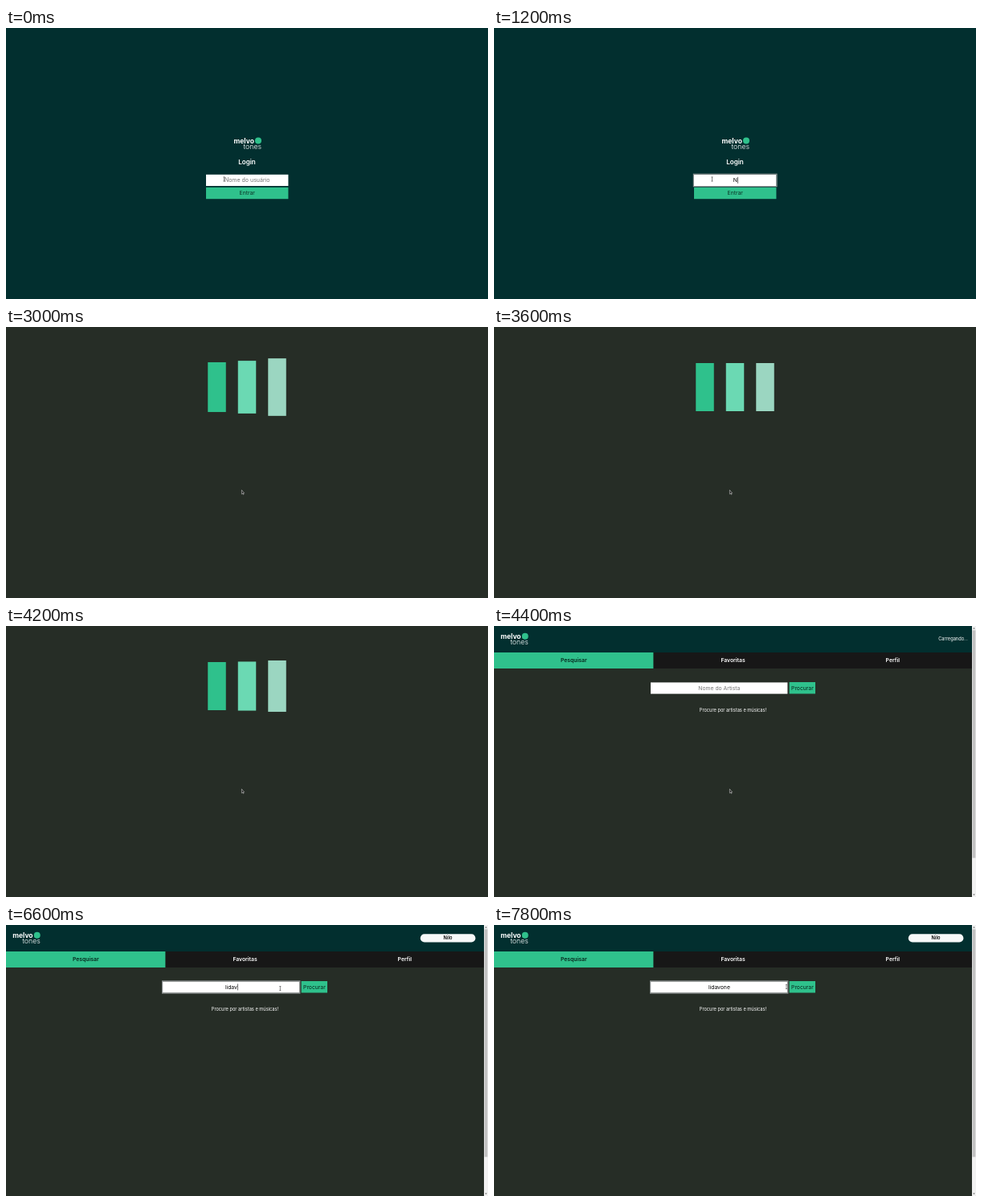
Animation, 600 px wide and 338 px high, one loop 8000 ms. Source, as an HTML page:

```html
<!DOCTYPE html>
<html lang="pt-BR">
<head>
<meta charset="utf-8">
<title>Login e pesquisa</title>
<style>
  html, body { margin: 0; width: 100%; height: 100%; overflow: hidden; background: #022f2f; }
  svg { display: block; width: 100vw; height: 100vh; }
  text { font-family: Inter, "Open Sans", sans-serif; font-size: 6.8px; }
  .mid { text-anchor: middle; }
  .semi { font-weight: 600; }
  .small { font-size: 5.7px; }
  .white { fill: #fff; }
  .hint { fill: #757575; }
  .ring { fill: none; stroke: #8d9292; stroke-width: 1.2; }
  .caret { fill: #111; }
</style>
</head>
<body>
<svg viewBox="0 0 600 338" preserveAspectRatio="none">
  <defs>
    <g id="logo">
      <text class="white" y="8" style="font-size:8.5px;font-weight:700">melvo</text>
      <text class="white" x="12" y="15" style="font-size:8.8px;font-weight:300">tones</text>
      <circle cx="30.5" cy="4.5" r="4" fill="#2fc18c"/>
    </g>
  </defs>

  <g id="login">
    <rect width="600" height="338" fill="#022f2f"/>
    <use href="#logo" x="283.5" y="136"/>
    <text class="mid semi white" x="300" y="170.4" style="font-size:8.1px">Login</text>
    <rect x="249" y="182.8" width="102.4" height="14.2" fill="#fff"/>
    <rect class="ring" id="userRing" x="248.4" y="182.2" width="103.6" height="15.4"/>
    <text class="mid hint" id="userHint" x="300.2" y="192" style="font-size:7px">Nome do usuário</text>
    <text class="mid" id="user" x="300.2" y="192"></text>
    <rect class="caret" id="userCaret" y="185.8" width=".6" height="8"/>
    <rect id="enter" x="249" y="198.8" width="102.4" height="14.4"/>
    <text class="mid" id="enterText" x="300.2" y="208.2">Entrar</text>
  </g>

  <g id="loader">
    <rect width="600" height="338" fill="#262d26"/>
    <rect class="bar" x="251.25" width="22.5" fill="#2fc18c"/>
    <rect class="bar" x="288.75" width="22.5" fill="#6bd9b3"/>
    <rect class="bar" x="326.25" width="22.5" fill="#9bd6c1"/>
  </g>

  <g id="search">
    <rect width="600" height="338" fill="#262d26"/>
    <rect width="595" height="33" fill="#022f2f"/>
    <use href="#logo" x="8.2" y="8.2"/>
    <text class="small white" id="wait" x="590" y="18.2" text-anchor="end">Carregando...</text>
    <g id="pill">
      <rect x="515.8" y="11.3" width="68.6" height="10.2" rx="5.1" fill="#f7f9f9"/>
      <text class="mid semi small" x="550" y="18.4">Nilo</text>
    </g>
    <rect y="33" width="595" height="20" fill="#171717"/>
    <rect y="33" width="198.4" height="20" fill="#2fc18c"/>
    <text class="mid semi" x="99.3" y="45.3" fill="#06251c">Pesquisar</text>
    <text class="mid semi white" x="297.5" y="45.3">Favoritas</text>
    <text class="mid semi white" x="496.3" y="45.3">Perfil</text>
    <rect x="195" y="70.4" width="170.4" height="14.2" fill="#fff"/>
    <rect class="ring" id="artistRing" x="194.6" y="69.9" width="171.2" height="15.2"/>
    <text class="mid hint" id="artistHint" x="280.4" y="79.7">Nome do Artista</text>
    <text class="mid" id="artist" x="280.4" y="79.7"></text>
    <rect class="caret" id="artistCaret" y="73.4" width=".6" height="8"/>
    <rect x="367.6" y="70" width="32.4" height="14.5" fill="#2fc18c"/>
    <text class="mid" x="383.9" y="79.7" fill="#06251c">Procurar</text>
    <text class="mid small white" x="297.5" y="107.4">Procure por artistas e músicas!</text>
    <rect x="595" width="5" height="338" fill="#f1f1f1"/>
    <rect x="595.6" y="5.3" width="3.8" height="284" fill="#c1c1c1"/>
    <path d="M596.3 3.4h2.4l-1.2-1.5zM596.3 334.6h2.4l-1.2 1.5z" fill="#505050"/>
  </g>

  <g id="cursor">
    <path id="arrow" d="M-.6-2.6V2.3L.5 1.4l.8 1.6.7-.4-.7-1.5H2.6z" fill="#111" stroke="#eee" stroke-width=".5"/>
    <path id="beam" d="M-1-2.6H1M0-2.6V2.6M-1 2.6H1" fill="none" stroke="#333" stroke-width=".6"/>
    <path id="hand" d="M-.8-2.4h.9v2l1.9.5v1.5L1.4 2.8H-1L-2 .9l.5-.6.7.5z" fill="#fff" stroke="#111" stroke-width=".6"/>
  </g>
</svg>
<script>
const LOOP = 8000, TICK = 200;
const LOADING = 3000, SEARCH = 4400;
const $ = id => document.getElementById(id);
const bars = document.querySelectorAll('.bar');

const show = (id, on) => { $(id).style.display = on ? '' : 'none'; };

// time, x, y
const path = [
  [0, 271.5, 188.5], [2100, 271.5, 188.5], [2500, 294, 206], [4700, 294, 206],
  [5300, 285.8, 82], [6200, 285.8, 82], [6900, 383, 77], [7100, 383, 77],
  [7200, 371, 77], [7500, 371, 77], [7700, 364, 77], [LOOP, 364, 77]
];

const fields = [
  { id: 'user', word: 'Nilo', focus: 300, blur: 2700, keys: [1150, 1350, 1450, 1600] },
  { id: 'artist', word: 'lidavone', focus: 5300, blur: LOOP,
    keys: [6000, 6140, 6280, 6420, 6560, 6700, 6840, 7000] }
];

function cursorAt(t) {
  const i = path.findIndex((p, n) => n && t <= p[0]);
  const [a, b] = [path[i - 1], path[i]];
  const k = (t - a[0]) / (b[0] - a[0]);
  return [a[1] + (b[1] - a[1]) * k, a[2] + (b[2] - a[2]) * k];
}

// cubic-bezier(0, .5, .5, 1), solved by bisection
function easeOut(x) {
  let lo = 0, hi = 1;
  for (let i = 0; i < 24; i++) {
    const s = (lo + hi) / 2;
    if (1.5 * s * s - 0.5 * s ** 3 < x) lo = s; else hi = s;
  }
  return 1.5 * lo - 0.5 * lo ** 3;
}

function drawField(f, t) {
  const typed = f.keys.filter(k => k <= t);
  const focused = t >= f.focus && t < f.blur;
  const last = typed.length ? typed[typed.length - 1] : f.focus;
  const text = $(f.id);
  text.textContent = f.word.slice(0, typed.length);
  show(f.id + 'Hint', !typed.length);
  show(f.id + 'Ring', focused);
  show(f.id + 'Caret', focused && (t - last) % 1000 < 500);
  const half = typed.length ? text.getComputedTextLength() / 2 : 0;
  $(f.id + 'Caret').setAttribute('x', +text.getAttribute('x') + half + 0.3);
}

function drawBars(t) {
  const phase = 0.15 + (t - LOADING) * 0.00095;
  bars.forEach((bar, i) => {
    const p = (phase + 0.2 - i * 0.1) % 1;
    const h = 96 - 36 * easeOut(Math.min(1, p * 2));
    bar.setAttribute('y', 75 - h / 2);
    bar.setAttribute('height', h);
  });
}

function drawCursor(t) {
  const [x, y] = cursorAt(t);
  const login = t < LOADING, search = t >= SEARCH;
  const inRow = search && y > 70 && y < 85;
  const hover = login && y > 198.7;
  const beam = login && y < 197 || inRow && x < 366;
  const hand = hover || inRow && x > 367;
  show('beam', beam);
  show('hand', hand);
  show('arrow', !beam && !hand);
  $('cursor').setAttribute('transform', `translate(${x} ${y})`);
  $('enter').setAttribute('fill', hover ? '#d0d1d4' : '#2fc18c');
}

function render(t) {
  show('login', t < LOADING);
  show('loader', t >= LOADING && t < SEARCH);
  show('search', t >= SEARCH);
  if (t < LOADING) drawField(fields[0], t);
  else if (t < SEARCH) drawBars(t);
  else drawField(fields[1], t);
  $('enterText').setAttribute('fill', t < 1600 ? '#0b3427' : '#000');
  show('wait', t < 6200);
  show('pill', t >= 6200);
  drawCursor(t);
}

const start = performance.now();
function frame() {
  const t = (performance.now() - start) % LOOP;
  render(Math.floor(t / TICK) * TICK);
  requestAnimationFrame(frame);
}
frame();
</script>
</body>
</html>
```
